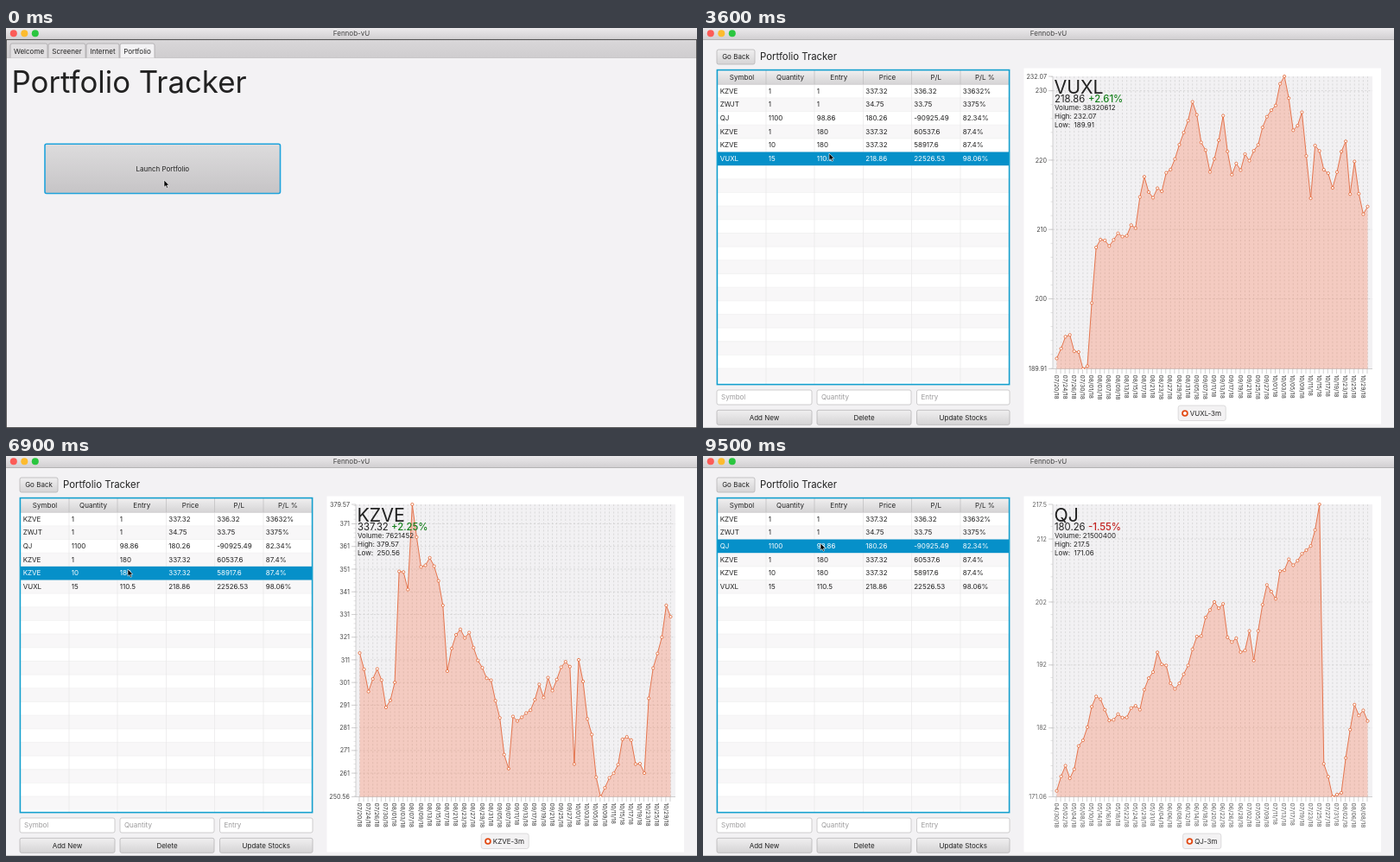
These frames come from a looping animation (800x463 px, 9600 ms). An HTML page:

```html
<!DOCTYPE html>
<html lang="en">
<head>
<meta charset="utf-8">
<title>Portfolio Tracker</title>
<style>
html, body { margin: 0; width: 100%; height: 100%; overflow: hidden; background: #f3f2f4; }
svg { display: block; width: 100vw; height: 100vh; }
text { font-family: Inter, Roboto, sans-serif; font-size: 8px; fill: #222; white-space: pre; }
.axis { font-size: 7.2px; fill: #444; }
.date { font-size: 6.8px; fill: #333; }
</style>
</head>
<body>
<svg viewBox="0 0 800 463">
  <defs>
    <linearGradient id="bar" x2="0" y2="1"><stop stop-color="#ebe9eb"/><stop offset="1" stop-color="#d1cfd1"/></linearGradient>
    <linearGradient id="tabs" x2="0" y2="1"><stop stop-color="#d9d7d9"/><stop offset="1" stop-color="#cfcdcf"/></linearGradient>
    <linearGradient id="button" x2="0" y2="1"><stop stop-color="#f0eff0"/><stop offset="1" stop-color="#d5d4d5"/></linearGradient>
    <linearGradient id="launch" x2="0" y2="1"><stop stop-color="#dddcdd"/><stop offset="1" stop-color="#c6c4c6"/></linearGradient>
    <linearGradient id="pressed" x2="0" y2="1"><stop stop-color="#cfcecf"/><stop offset="1" stop-color="#b9b7b9"/></linearGradient>
    <clipPath id="plot"><rect x="402" y="52" width="376" height="343"/></clipPath>
  </defs>
  <g id="frame"></g>
  <g id="welcome"></g>
  <g id="portfolio"><g id="table"></g><g id="chart"></g></g>
  <path id="cursor" d="M0 0V8.2L1.9 6.5L3.2 9.3L4.6 8.7L3.3 6H5.8Z" fill="#000" stroke="#fff" stroke-width=".6"/>
</svg>
<script>
const LOOP = 9600, OPEN = 700, DAYS = 72;
const LEFT = 405, RIGHT = 775, TOP = 56, BOTTOM = 394.5, FIRST_X = 409.5, STEP = 5.07;
const SPREAD_START = 2080, SPREAD_TIME = 905, TIGHT_STEP = 0.63;

// Each trend lists turning points as [day, price]; the days between are interpolated with a little noise.
const stocks = {
  VUXL: {
    price: '218.86', change: '+2.61%', volume: '38320612', low: 189.91, high: 232.07, tick: 200, start: [6, 20], noise: 0.9,
    trend: [[0, 191.4], [3, 194.8], [6, 189.9], [7, 190.3], [9, 207.4], [18, 210.2], [20, 217.6], [21, 215.4],
      [24, 215.5], [31, 228.4], [35, 218.3], [38, 226.4], [40, 217.9], [46, 222.2], [52, 232.07], [54, 224.3],
      [56, 226.9], [58, 214.5], [59, 222.1], [63, 216], [66, 222.7], [67, 215.1], [68, 219.8], [70, 212.2], [71, 213.3]]
  },
  KZVE: {
    price: '337.32', change: '+2.25%', volume: '7621452', low: 250.56, high: 379.57, tick: 261, start: [6, 20], noise: 4,
    trend: [[0, 314], [2, 297], [4, 307], [6, 290], [8, 301], [9, 350], [11, 342], [12, 379.57], [14, 352], [16, 356],
      [19, 335], [20, 306], [22, 322], [25, 323], [30, 302], [34, 263], [35, 286], [48, 308], [49, 265], [50, 311],
      [55, 250.56], [61, 277], [65, 261], [66, 294], [70, 335], [71, 330]]
  },
  QJ: {
    price: '180.26', change: '-1.55%', volume: '21500400', low: 171.06, high: 217.5, tick: 182, start: [3, 30], noise: 0.9,
    trend: [[0, 172], [2, 176], [3, 174], [9, 187], [12, 183.2], [19, 184.9], [23, 194], [27, 188.2], [36, 202],
      [38, 201.7], [39, 196.4], [43, 194.3], [44, 197.4], [45, 192.7], [48, 204.7], [50, 202.5], [51, 206.9],
      [58, 210.9], [60, 217.5], [61, 176.3], [63, 171.06], [65, 171.7], [68, 185.7], [71, 183.1]]
  }
};

const rows = [
  ['KZVE', '1', '1', '337.32', '336.32', '33632%'],
  ['ZWJT', '1', '1', '34.75', '33.75', '3375%'],
  ['QJ', '1100', '98.86', '180.26', '-90925.49', '82.34%'],
  ['KZVE', '1', '180', '337.32', '60537.6', '87.4%'],
  ['KZVE', '10', '180', '337.32', '58917.6', '87.4%'],
  ['VUXL', '15', '110.5', '218.86', '22526.53', '98.06%']
];
const clicks = [[SPREAD_START, 5], [5620, 4], [7550, 3], [8880, 2]]
  .map(([time, row]) => ({ time, row, name: rows[row][0] }));
// Cursor stops as [arrival, x, y].
const cursorStops = [[0, 183, 176], [1900, 146, 145], [5500, 141, 131], [7450, 141, 119], [8800, 136, 101]];

const $ = id => document.getElementById(id);
const clamp = (v, lo = 0, hi = 1) => Math.max(lo, Math.min(hi, v));
const lerp = (a, b, u) => a + (b - a) * u;
const times = (n, fn) => Array.from({ length: n }, (_, i) => fn(i)).join('');
const rect = (x, y, w, h, fill, more = '') => `<rect x="${x}" y="${y}" width="${w}" height="${h}" fill="${fill}" ${more}/>`;
const line = (x1, y1, x2, y2, more = 'stroke="#bdbcbd" stroke-width=".7"') =>
  `<path d="M${x1} ${y1}L${x2} ${y2}" ${more}/>`;
const text = (x, y, s, more = '') => `<text x="${x}" y="${y}" ${more}>${s}</text>`;
const middle = 'text-anchor="middle"';
const group = (s, opacity) => `<g opacity="${opacity}">${s}</g>`;
const button = (x, y, w, h, label) =>
  rect(x, y, w, h, 'url(#button)', 'rx="2" stroke="#b5b4b5" stroke-width=".8"') +
  text(x + w / 2, y + h / 2 + 2.9, label, middle);

function tradingDays([month, day]) {
  const closed = ['05/28/18', '07/04/18', '09/03/18'], days = [];
  const pad = n => String(n).padStart(2, '0');
  for (const d = new Date(2018, month, day); days.length < DAYS; d.setDate(d.getDate() + 1)) {
    const label = `${pad(d.getMonth() + 1)}/${pad(d.getDate())}/18`;
    if (d.getDay() % 6 && !closed.includes(label)) days.push(label);
  }
  return days;
}

function closingPrices({ trend, noise, low, high }) {
  return Array.from({ length: DAYS }, (_, day) => {
    const next = trend.findIndex(p => p[0] >= day), [d1, p1] = trend[next];
    if (d1 == day) return p1;
    const [d0, p0] = trend[next - 1];
    const jitter = Math.sin(day * day * 12.9) * noise;
    return clamp(lerp(p0, p1, (day - d0) / (d1 - d0)) + jitter, low, high);
  });
}

for (const s of Object.values(stocks)) {
  s.days = tradingDays(s.start);
  s.closes = closingPrices(s);
  s.y = v => BOTTOM - (v - s.low) * (BOTTOM - TOP) / (s.high - s.low);
}

function drawFrame() {
  $('frame').innerHTML = rect(0, 0, 800, 463, '#f3f2f4') + rect(0, 0, 800, 13.5, 'url(#bar)') +
    line(0, 13.5, 800, 13.5, 'stroke="#a9a7a9" stroke-width=".8"') +
    ['#fc5b57', '#fdbb2e', '#2ac63f'].map((c, i) => `<circle cx="${8.8 + 12.5 * i}" cy="6.3" r="4" fill="${c}"/>`).join('') +
    text(400, 9.3, 'Fennob-vU', middle + ' style="fill:#444"') +
    line(0, 462.7, 800, 462.7, 'stroke="#999" stroke-width=".6"');
}

function drawWelcome(pressed) {
  const tabs = [['Welcome', 5, 43], ['Screener', 49, 43], ['Internet', 93, 38], ['Portfolio', 132, 40]];
  $('welcome').innerHTML = rect(0, 14, 800, 20.5, 'url(#tabs)') + line(0, 34.5, 800, 34.5) +
    tabs.map(([label, x, w], i) =>
      `<path d="M${x} 34.5V20q0-2 2-2h${w - 4}q2 0 2 2v14.5" fill="${i == 3 ? '#f3f2f4' : '#e2e0e2'}" stroke="#aaa8aa" stroke-width=".8"/>` +
      text(x + w / 2, 29.6, label, middle)).join('') +
    rect(0.4, 13.4, 799.2, 449.2, 'none', 'stroke="#444" stroke-width=".9"') +
    text(6.5, 74.5, 'Portfolio Tracker', 'style="font-size:34.8px"') +
    rect(45, 134.3, 272.5, 57.2, `url(#${pressed ? 'pressed' : 'launch'})`, 'rx="2" stroke="#1fa3dc" stroke-width="1.6"') +
    text(181.3, 165.8, 'Launch Portfolio', middle);
}

function drawTable(selected) {
  const edges = [17, 73, 129, 185.5, 241.5, 298, 354.5], top = 65.2, height = 15.66;
  const heads = ['Symbol', 'Quantity', 'Entry', 'Price', 'P/L', 'P/L %'];
  const rowY = i => top + height * i;
  let s = button(16, 25, 44, 17, 'Go Back') + text(66, 36.8, 'Portfolio Tracker', 'style="font-size:11.4px"');
  s += rect(16, 48.5, 339, 364, '#fff') + rect(17, 49, 337.5, 16.2, 'url(#button)');
  s += times(22, i => rect(17, rowY(i), 337.5, Math.min(height, 412 - rowY(i)), i % 2 ? '#f8f7f8' : '#fff') +
    line(17, rowY(i), 354.5, rowY(i), 'stroke="#ececec" stroke-width=".6"'));
  s += edges.slice(1).map(x => line(x, 49, x, 65) + line(x, 65, x, 412, 'stroke="#e8e7e8" stroke-width=".7"')).join('');
  s += line(17, top, 354.5, top);
  if (selected >= 0) s += rect(17, rowY(selected), 337.5, height, '#0690c9');
  s += heads.map((h, i) => text((edges[i] + edges[i + 1]) / 2, 60, h, middle)).join('');
  s += rows.map((cells, r) => cells.map((c, i) =>
    text(edges[i] + 2.7, rowY(r) + 10.6, c, r == selected ? 'style="fill:#fff"' : '')).join('')).join('');
  s += rect(16.4, 48.6, 338.2, 364, 'none', selected < 0 ? 'stroke="#c4c3c4" stroke-width=".8"' : 'stroke="#139fce" stroke-width="1.6"');
  [['Symbol', 'Add New', 16, 110], ['Quantity', 'Delete', 132, 109], ['Entry', 'Update Stocks', 247.5, 107.5]]
    .forEach(([hint, label, x, w]) => {
      s += rect(x, 419, w, 17, '#fff', 'rx="2" stroke="#c2c1c2" stroke-width=".8"') +
        text(x + 5, 430.3, hint, 'style="fill:#9b9a9b"') + button(x, 442.3, w, 17, label);
    });
  $('table').innerHTML = s;
}

const axisLabel = (y, label) => text(398, y + 2.6, label, 'text-anchor="end" class="axis"');
const dashed = 'stroke="#cfcecf" stroke-width=".7" stroke-dasharray="2.1 2.1"';
const gridRow = y => line(LEFT, y, RIGHT, y, dashed) + line(400, y, LEFT, y);

const emptyY = i => 442 - i * 35.1;
const emptyAxis = () => times(12, i => axisLabel(emptyY(i), i * 10));

function emptyChart() {
  return rect(LEFT, TOP, RIGHT - LEFT, 386, '#f2f1f3') + times(12, i => gridRow(emptyY(i))) +
    emptyAxis() + line(LEFT, TOP, LEFT, 442) + line(LEFT, 442, RIGHT, 442);
}

function series(stock, step, rise) {
  const points = stock.closes.map((v, i) => [FIRST_X + step * i, stock.y(v * rise)].map(n => +n.toFixed(2)));
  const path = points.map(p => p.join(' ')).join('L');
  const lastX = points[DAYS - 1][0];
  return `<path d="M${FIRST_X} ${BOTTOM}L${path}L${lastX} ${BOTTOM}Z" fill="#f8643a" opacity=".27"/>` +
    `<path d="M${path}" fill="none" stroke="#e2693f" stroke-width=".9" stroke-linejoin="round"/>` +
    points.map(([x, y]) => `<circle cx="${x}" cy="${y}" r="1.6" fill="#fff" stroke="#e2622f" stroke-width=".8"/>`).join('');
}

function axes(stock, step, tickStep, yFade, xFade) {
  const x = i => FIRST_X + step * i, tickX = i => FIRST_X - 0.5 + tickStep * i;
  let s = times(DAYS, i => line(x(i), TOP, x(i), BOTTOM, dashed));
  let labels = axisLabel(TOP, stock.high) + axisLabel(BOTTOM, stock.low);
  for (let v = stock.tick; v < stock.high; v += 10) {
    s += gridRow(stock.y(v));
    labels += axisLabel(stock.y(v), v);
  }
  for (let v = stock.tick - 10; v < stock.high; v += 2)
    if (v > stock.low) s += line(402.5, stock.y(v), LEFT, stock.y(v), 'stroke="#c9c8c9" stroke-width=".5"');
  s += line(400, TOP, LEFT, TOP) + line(LEFT, TOP, LEFT, BOTTOM) + line(400, BOTTOM, RIGHT, BOTTOM);
  s += times(DAYS, i => line(tickX(i), BOTTOM, tickX(i), 400));
  const dates = stock.days.map((d, i) => i % 2 ? '' :
    `<text transform="translate(${tickX(i) - 2.4} 401.5) rotate(90)" class="date">${d}</text>`).join('');
  return s + group(labels, yFade) + group(dates, xFade);
}

function summary(name, stock) {
  const color = stock.change[0] == '+' ? '#15801c' : '#c3211f';
  const legend = name + '-3m', half = 8.5 + legend.length * 2.72;
  return text(406.5, 76, name, 'style="font-size:21.3px"') +
    text(407, 86.2, stock.price, 'style="font-size:11.3px"') +
    text(446, 86.2, stock.change, `style="font-size:11.3px;font-weight:500;fill:${color}"`) +
    text(407, 95.3, 'Volume: ' + stock.volume) + text(407, 105.3, 'High: ' + stock.high) +
    text(407, 115.3, 'Low:  ' + stock.low) +
    rect(577.7 - half, 437, half * 2, 17.5, '#f3f2f3', 'rx="2.5" stroke="#d5d4d5" stroke-width=".8"') +
    `<circle cx="${585.5 - half}" cy="446" r="2.9" fill="#fff" stroke="#e14a14" stroke-width="1.8"/>` +
    text(591.3 - half, 448.9, legend);
}

function drawChart(t, current) {
  let s = rect(371.5, 46.5, 413.5, 412, '#fff');
  if (current < 0) {
    $('chart').innerHTML = s + emptyChart();
    return;
  }
  const { time, name } = clicks[current], previous = clicks[current - 1];
  const stock = stocks[name], age = t - time, fade = clamp(age / 750);
  const spread = clamp((t - SPREAD_START) / SPREAD_TIME);
  const step = lerp(TIGHT_STEP, STEP, spread);
  const sameAxis = previous && previous.name == name;
  s += rect(LEFT, TOP, RIGHT - LEFT, BOTTOM - TOP, '#f2f1f3');
  s += axes(stock, step, spread < 1 ? TIGHT_STEP : STEP, sameAxis ? 1 : fade, fade);
  if (!previous && age < 250) s += group(emptyAxis(), 1 - age / 250);
  s += '<g clip-path="url(#plot)">';
  if (previous && age < 400) s += group(series(stocks[previous.name], STEP, 1), 1 - age / 400);
  s += group(series(stock, step, clamp(age / 500)), clamp(age / 200)) + '</g>';
  $('chart').innerHTML = s + summary(name, stock);
}

function cursorAt(t) {
  const MOVE = 250;
  let [, x, y] = cursorStops[0];
  for (const [arrival, nextX, nextY] of cursorStops.slice(1)) {
    const u = clamp((t - arrival + MOVE) / MOVE), ease = u * u * (3 - 2 * u);
    x = lerp(x, nextX, ease);
    y = lerp(y, nextY, ease);
  }
  return [x, y];
}

const drawn = {};
function refresh(part, key, draw) {
  if (drawn[part] === key) return;
  drawn[part] = key;
  draw();
}

function render(t) {
  const open = t >= OPEN, current = clicks.filter(c => c.time <= t).length - 1;
  $('welcome').style.display = open ? 'none' : '';
  $('portfolio').style.display = open ? '' : 'none';
  if (open) {
    const settled = current < 0 || t - clicks[current].time > 1000;
    refresh('table', current, () => drawTable(current < 0 ? -1 : clicks[current].row));
    refresh('chart', settled ? 'settled' + current : t, () => drawChart(t, current));
  } else {
    const pressed = t >= 400 && t < 500;
    refresh('welcome', pressed, () => drawWelcome(pressed));
  }
  $('cursor').setAttribute('transform', `translate(${cursorAt(t)})`);
}

drawFrame();
const began = performance.now();
function tick() {
  render((performance.now() - began) % LOOP);
  requestAnimationFrame(tick);
}
tick();
</script>
</body>
</html>
```
